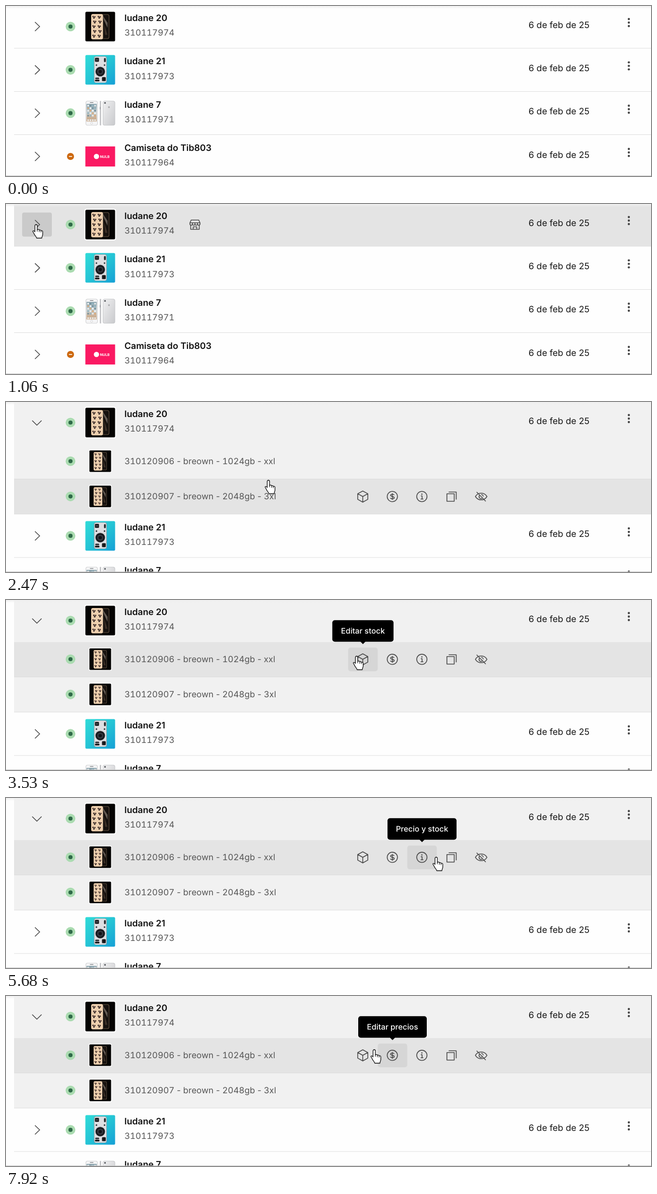
An HTML page for the animation above (7.99 s loop, 1280 px wide and 339 px high).

```html
<!DOCTYPE html>
<html lang="es">
<head>
<meta charset="utf-8">
<title>Catálogo</title>
<style>
  html, body { margin: 0; width: 100%; height: 100%; overflow: hidden; background: #fefefe; }
  svg { display: block; width: 1280px; height: 339px; }
  text { font-family: Inter, "Liberation Sans", sans-serif; text-rendering: geometricPrecision; }
  .title { font-size: 17.7px; font-weight: 600; fill: #111; }
  .code { font-size: 17px; fill: #555; }
  .num { font-variant-numeric: tabular-nums; }
  .date { font-size: 17.6px; fill: #161616; }
  .tip { font-size: 15.4px; font-weight: 500; fill: #fff; text-anchor: middle; }
  .line { fill: none; stroke: #4a4a4a; stroke-width: 1.6; stroke-linejoin: round; }
</style>
</head>
<body>
<svg id="stage" viewBox="0 0 1280 339"></svg>
<script>
const LOOP = 7990, OPEN_AT = 1130, SHIFT = 139.6, PITCH = 86.35;

const rect = (x, y, w, h, fill, rx = 0, extra = '') =>
  `<rect x="${x}" y="${y}" width="${w}" height="${h}" fill="${fill}" rx="${rx}" ${extra}/>`;
const dot = (x, y, r, fill) => `<circle cx="${x}" cy="${y}" r="${r}" fill="${fill}"/>`;
const text = (x, y, cls, s) => `<text x="${x}" y="${y}" class="${cls}">${s}</text>`;
const code = (x, y, s) => text(x, y, 'code', s.replace(/\d+/g, n => `<tspan class="num">${n}</tspan>`));
const group = (x, y, body, id = '') => `<g id="${id}" transform="translate(${x} ${y})">${body}</g>`;
const line = d => `<path class="line" d="${d}"/>`;

// Thumbnails, drawn in a 59 px square
function goldPhones() {
  let s = rect(-2, -2, 63, 63, '#fff', 4) + rect(0, 0, 59, 59, '#050403', 2.5);
  s += rect(30, 5, 17.5, 49, '#6b5846', 3.5) + rect(31, 6, 15.5, 47, '#17120f', 3);
  s += '<path d="M34 7L44 22V32L37 17Z" fill="#655c54"/><path d="M37 25L44 46H39Z" fill="#3c3027"/>';
  s += rect(11.5, 4.5, 23.5, 50.5, '#edcfae', 3.5);
  for (let r = 0; r < 5; r++) for (let c = 0; c < 2; c++) {
    const x = 17 + c * 10.5 + (r % 2 ? 1.5 : 0), y = 10.5 + r * 9.4;
    s += dot(x - 1.7, y - 1, 1.5, '#382724') + dot(x + 1.8, y - .6, 1.5, '#49332f') + dot(x, y + 1.8, 1.5, '#241b1b');
  }
  return s;
}
function cameraPhone() {
  let s = rect(0, 0, 59, 59, 'url(#teal)', 2.5);
  s += rect(17, 2.5, 25.5, 53, '#8c9ba2', 4) + rect(18, 3.2, 23.5, 51.6, '#dedfe2', 3.5);
  s += rect(19, 5.5, 8, 8, '#191a1c', 1.5) + rect(37, 6, 3.5, 8, '#25272b', 1.5);
  s += dot(23, 9.5, 2, '#44484e') + dot(22, 20, 1.6, '#34383d') + dot(38, 20, 1.6, '#34383d');
  s += dot(29.5, 33, 10.3, '#b9bbc0') + dot(29.5, 33, 9.3, '#17191d') + dot(29.5, 33, 6, '#353840') + dot(29.5, 33, 3.3, '#111217');
  s += rect(33, 44, 7.5, 8, '#191a1c', 1.5) + rect(19.5, 45, 8, 3, '#292b30', 1.5) + rect(19, 49, 9, 3.5, '#191a1c', 1.5);
  return s;
}
function silverPhones() {
  let s = rect(.5, 5, 24, 49, '#c6c7c9', 4) + rect(1.3, 5.8, 22.4, 47.4, '#f5f5f6', 3.5);
  s += rect(2.2, 11, 20.4, 35, 'url(#screen)');
  s += rect(9, 7.8, 7, 1, '#55585c', .5);
  const tint = ['#fff', '#8fb4c2', '#e0a872', '#6d8b99', '#f2f2f2'];
  for (let i = 0; i < 20; i++)
    s += rect(4 + i % 4 * 4.6, 13 + Math.floor(i / 4) * 5, 3, 3, tint[(i * 3) % 5], .7);
  s += rect(3, 41, 19, 4.5, '#c9b7a1') + [0, 1, 2, 3].map(i => rect(4 + i * 4.6, 42, 3, 3, '#f1f1f1', .7)).join('');
  s += '<circle cx="12.4" cy="49.7" r="2" fill="#fff" stroke="#b5b7bb" stroke-width=".6"/>';
  s += rect(28.7, 5, 2.5, 49, '#bfc0c3', 1) + rect(28.7, 17, 1, 5, '#87898d');
  s += rect(34.5, 5, 24.5, 49, '#bcbec1', 4) + rect(35.2, 5.7, 23, 47.6, 'url(#silver)', 3.4);
  s += dot(39, 9, 1.7, '#55585d') + dot(46.8, 17.5, 1.7, '#aaabad');
  return s;
}
const shirt = () => rect(0, 9.5, 59, 40, '#fa1962') + dot(22, 29.5, 5.2, '#fff') +
  '<text x="29" y="32.2" fill="#fff" font-size="7" font-weight="700">NULB</text>';

const active = dot(128, 41, 9.6, '#aadbb0') + dot(128, 41, 4.1, '#2f6a48');
const paused = dot(128, 41, 7, '#cc680f') + rect(124.8, 40.2, 6.4, 1.6, '#fff');
const chevron = line('M57.5 32L66.8 41L57.5 50');

function row(i, name, sku, thumb, status, arrow) {
  const dots = [33, 40, 26].map(y => dot(1236, y, 2.2, '#484848')).join('');
  return group(0, i * PITCH, arrow + status + group(157.5, 11.5, thumb) +
    text(235, 30, 'title', name) + code(235, 59.3, sku) +
    text(1037, 43.5, 'date', '6 de feb de 25') + dots);
}
const rule = y => rect(16, y, 1264, 1, '#dedede');
function variant(y, label) {
  const thumb = `<g transform="translate(165.5 ${y - 21.5}) scale(.73)">${goldPhones()}</g>`;
  return group(0, y - 41, active) + thumb + code(235, y + 6, label);
}

const ICON_X = [708, 766.7, 825.3, 884, 943];
const icons = [
  line('M0 -11L10 -5.6V5.6L0 11.2L-10 5.6V-5.6ZM-10 -5.6L0 0L10 -5.6M0 0V11'),
  line('M10.2 0A10.2 10.2 0 1 1 -10.2 0A10.2 10.2 0 1 1 10.2 0M3.6 -3C2.8 -5.2 -3.5 -5 -3.5 -2.4C-3.5 .7 3.8 -.7 3.8 2.5C3.8 5.2 -3 5.2 -3.8 2.8M0 -6.6V6.6'),
  line('M10.2 0A10.2 10.2 0 1 1 -10.2 0A10.2 10.2 0 1 1 10.2 0M-2 -1.2H.4V5M-2.5 5H3') + dot(0, -4.8, 1.3, '#4a4a4a'),
  line('M-9 -5.5H5.5V9.5H-9ZM-5.5 -9H9.5V6'),
  line('M-11.5 0C-6 -9 6 -9 11.5 0C6 9 -6 9 -11.5 0ZM-3.5 -2A4 4 0 0 0 2 3.6M0 -4A4 4 0 0 1 4 0M-9 -9L9 9.5')
];
const TIPS = [['Editar stock', 121.5], ['Editar precios', 136], ['Precio y stock', 137],
  ['Editar características', 197], ['Desactivar', 112.5]];
const tooltip = ([label, w], i) => group(ICON_X[i] + .3, 0,
  rect(-29.3, 94.7, 58.6, 47.5, '#d6d6d6', 5) +
  rect(-w / 2, 40.2, w, 43, '#000', 5) + '<path d="M-5.5 82.5H5.5L0 88Z"/>' +
  text(0, 67, 'tip', label), 'tip' + i);

const store = line('M-8.5 0V9.5H8.5V0M-7.5 -9H7.5L10 -3.5V-1C10 2 5 2 5 -1C5 2 0 2 0 -1C0 2 -5 2 -5 -1C-5 2 -10 2 -10 -1V-3.5ZM-10 -3.5H10M-5 -3.5V-1M0 -3.5V-1M5 -3.5V-1M-3.5 9.5V4.5H3.5V9.5');
const hand = '<path d="M7.5 1C9 1 9.8 2 9.8 3.3V11.3C10.6 10.3 13.4 10.5 13.8 12.1C14.8 11.4 16.8 11.8 17.2 13.2C18.6 12.7 20.6 13.4 20.6 15.4V20.4C20.6 23.4 19 24.4 18.8 28H8.6C8.2 25 5 23 3.6 19.4C2.8 17.4 1 15.8 1 14.6C1 12.9 3.4 12.7 5.2 15.5V3.3C5.2 2 6 1 7.5 1Z" fill="#fff" stroke="#111" stroke-width="1.3" stroke-linejoin="round"/>' +
  '<path d="M9.8 11V15M13.8 12.5V16M17.2 13.5V16.5" stroke="#111" stroke-width="1.1"/>';
const gradient = (id, dir, ...stops) => `<linearGradient id="${id}" x1="0" y1="0" ${dir}>` +
  stops.map((c, i) => `<stop offset="${i / (stops.length - 1)}" stop-color="${c}"/>`).join('') + '</linearGradient>';

const stage = document.getElementById('stage');
stage.innerHTML = '<defs>' +
  gradient('teal', 'x2="1" y2="1"', '#30dbd8', '#25c4d5', '#159fd5') +
  gradient('screen', 'x2="0" y2="1"', '#8aa3ad', '#c3cccd', '#cf9f74') +
  gradient('silver', 'x2="1" y2="1"', '#f0f0f1', '#c9cacd') +
  gradient('shade', 'x2="0" y2="1"', '#f0f0f0', '#f0f0f000') + '</defs>' +
  rect(0, 0, 1280, 339, '#fefefe') +
  rect(16, 0, 1264, 223, '#f1f1f1', 0, 'id="panel"') +
  rect(16, 0, 1264, 84, '#e4e4e4', 0, 'id="hover"') +
  rect(32, 17, 59, 48, '#d3d3d3', 4, 'id="button"') +
  row(0, 'ludane 20', '310117974', goldPhones(), active,
    `<g id="closed">${chevron}</g><g id="opened">${line('M52 37L61.3 46.3L70.6 37')}</g>`) +
  group(375, 41, store, 'store') +
  `<g id="topRule">${rule(83.7)}</g>` +
  `<g id="variants">${rule(153)}${variant(118, '310120906 - breown - 1024gb - xxl')}${variant(188.3, '310120907 - breown - 2048gb - 3xl')}${rule(223)}</g>` +
  group(0, 0,
    row(1, 'ludane 21', '310117973', cameraPhone(), active, chevron) + rule(170) +
    row(2, 'ludane 7', '310117971', silverPhones(), active, chevron) + rule(256) +
    row(3, 'Camiseta do Tib803', '310117964', shirt(), paused, chevron), 'rest') +
  TIPS.map(tooltip).join('') +
  group(0, 0, icons.map((s, i) => group(ICON_X[i], 0, s)).join(''), 'icons') +
  rect(0, 0, 1280, 6, 'url(#shade)') + rect(0, 338, 1280, 1, '#c8c8c8') +
  group(0, 0, group(-.8, -1, hand), 'hand');

// Pointer path: time, x, y
const PATH = [
  [130, 3, -30], [760, 53, 41], [1530, 53, 41], [2270, 420, 173], [2470, 514, 156],
  [3130, 687, 111], [3490, 687, 111], [3530, 689, 112], [3620, 688, 113], [3880, 688, 113],
  [4550, 752, 118], [4750, 752, 118], [5080, 812, 118], [5540, 812, 118], [5680, 847, 118],
  [6090, 876, 118], [6370, 876, 118], [6770, 926, 115], [7100, 926, 115], [7170, 922, 110],
  [7920, 724, 107]
];
function pointer(t) {
  if (t <= PATH[0][0]) return PATH[0].slice(1);
  const i = PATH.findIndex(k => k[0] > t);
  if (i < 0) return PATH[PATH.length - 1].slice(1);
  const [t0, x0, y0] = PATH[i - 1], [t1, x1, y1] = PATH[i];
  const u = (t - t0) / (t1 - t0), e = u * u * (3 - 2 * u);
  return [x0 + (x1 - x0) * e, y0 + (y1 - y0) * e];
}

const $ = id => document.getElementById(id);
const show = (id, on) => $(id).setAttribute('display', on ? 'inline' : 'none');
const move = (id, x, y) => $(id).setAttribute('transform', `translate(${x} ${y})`);

function draw(t) {
  const open = t >= OPEN_AT;
  const [x, y] = pointer(t);
  // Hover states trail the pointer slightly
  const [px, py] = pointer(t - 90);
  const hx = px + 8, hy = py + 1;
  const inside = hx > 16 && hy > 0;
  const over = !inside ? -1 : hy < 84 ? 0 : !open ? -1 : hy < 154 ? 1 : 2;
  const onButton = over === 0 && hx > 32 && hx < 91 && hy > 17 && hy < 65;
  const tip = over === 1 && hx > 679 ? Math.min(4, Math.floor((hx - 679) / 58.7)) : -1;

  ['panel', 'variants', 'opened'].forEach(id => show(id, open));
  ['closed', 'topRule'].forEach(id => show(id, !open));
  move('rest', 0, open ? SHIFT : 0);
  show('hover', over >= 0);
  $('hover').setAttribute('y', [0, 84, 153.5][Math.max(over, 0)]);
  $('hover').setAttribute('height', over > 0 ? 69.5 : 84);
  show('button', onButton);
  $('button').setAttribute('fill', t >= 1000 && t < OPEN_AT ? '#cacaca' : '#d3d3d3');
  show('store', over === 0);
  show('icons', over > 0);
  move('icons', 0, over === 2 ? 188.5 : 118.3);
  TIPS.forEach((_, i) => show('tip' + i, i === tip));
  show('hand', t >= 130);
  move('hand', x, y);
}
function frame() {
  draw(performance.now() % LOOP);
  requestAnimationFrame(frame);
}
frame();
</script>
</body>
</html>
```
